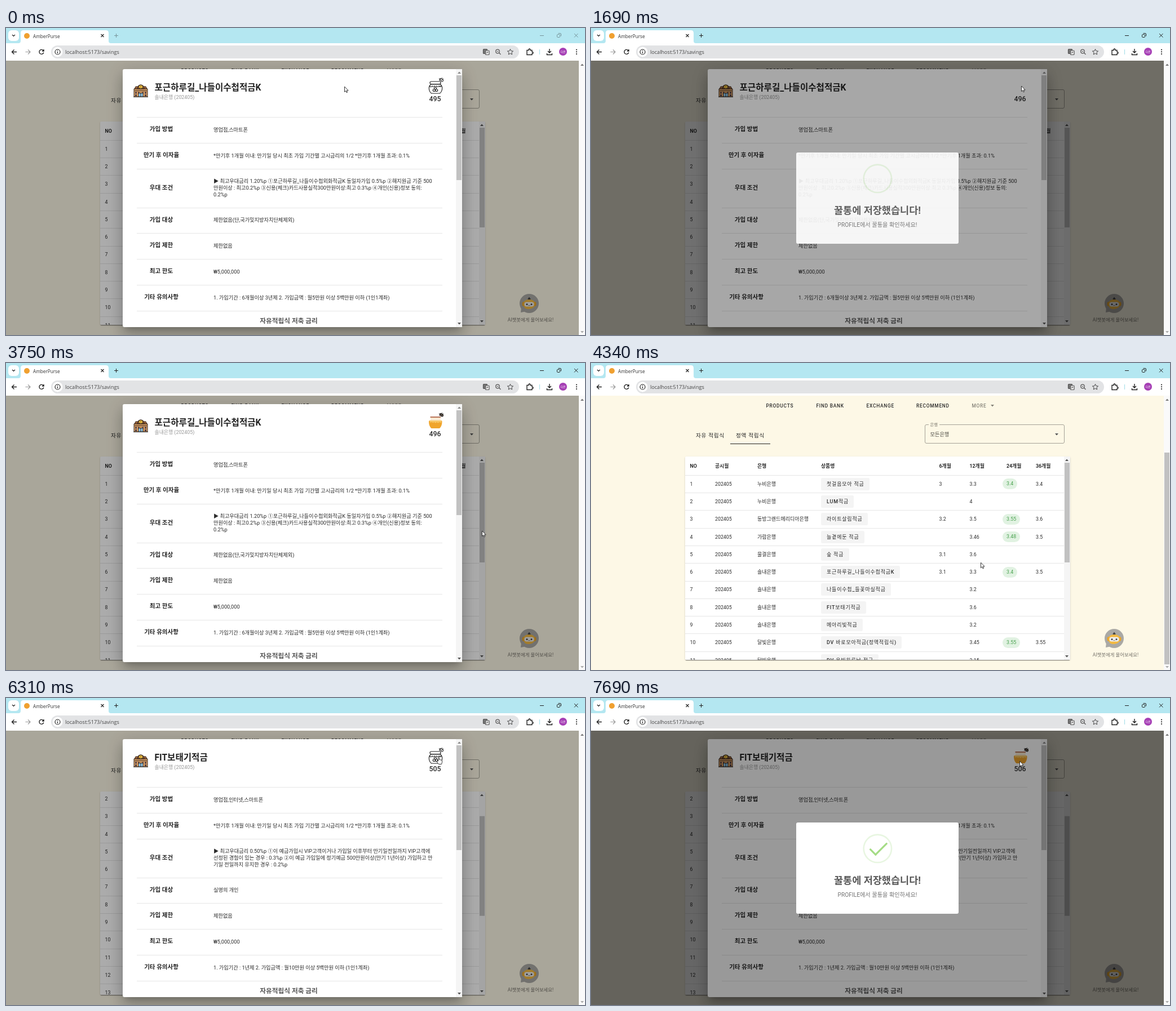
Recreate the animation shown at these times as an HTML page. Size 1027 by 545 pixels, loop 8 s.

```html
<!DOCTYPE html>
<html lang="ko">
<head>
<meta charset="utf-8">
<title>AmberPurse</title>
<style>
* { box-sizing: border-box; }
html, body { margin: 0; width: 100%; height: 100%; overflow: hidden; }
body { font: 9.2px Roboto, "Noto Sans CJK KR", "Noto Sans CJK", sans-serif; color: #2b2b2b; }
div, svg { position: absolute; }
#stage { left: 0; top: 0; width: 1027px; height: 545px; overflow: hidden; background: #fdf8e6; }
.layer { left: 0; top: 0; width: 1027px; height: 545px; }
.t { line-height: 12px; margin-top: -6px; white-space: pre; }
.mid { transform: translateX(-50%); }
.ui { font-family: "Open Sans", "Noto Sans", sans-serif; }
.nav { font-size: 8.4px; font-weight: 500; letter-spacing: .75px; }
.tab { font-size: 9.6px; font-weight: 500; letter-spacing: .75px; color: #222; }
.dim { color: #858278; }

#table { left: 167px; top: 166px; width: 683px; height: 361px; background: #fff; border-radius: 2px; overflow: hidden; }
#tableShadow { left: 167px; top: 166px; width: 683px; height: 361px; border-radius: 2px;
  box-shadow: 0 2px 1px -1px rgba(0,0,0,.3), 0 1px 1px rgba(0,0,0,.2), 0 1px 3px rgba(0,0,0,.15); }
#rows { left: -167px; top: -166px; width: 1027px; height: 860px; animation: rows 8s infinite; }
.line { height: 1px; background: #e6e6e6; }
.btn { height: 22px; line-height: 22px; padding: 0 9.4px 0 10px; border-radius: 2.5px; background: #f4f4f4;
  font-size: 9px; font-weight: 500; letter-spacing: .8px; white-space: pre; }
.hover { animation: hover 8s step-end infinite; }
.chip { height: 19px; line-height: 19px; padding: 0 7px; border-radius: 10px; background: #e1f2e2; color: #46a04c; font-size: 8.8px; }
.cell { font-size: 8.8px; }
.bar { background: #f5f5f5; }
.thumb { background: #c1c1c1; }
#tThumb { left: 840px; top: 177px; width: 9px; height: 177px; animation: tThumb 8s infinite; }
#pThumb { left: 1017px; top: 159px; width: 9px; height: 376px; animation: pThumb 8s step-end infinite; }

.scene { clip-path: inset(58px 11px 0 0); opacity: 0; }
.a { --d: -6480ms; animation: sceneA 8s step-end infinite; }
.b { --d: -1060ms; animation: sceneB 8s step-end infinite; }
.scrim { background: rgba(0,0,0,.33); }
.a .scrim { animation: scrimA 8s infinite; }
.b .scrim { animation: scrimB 8s infinite; }
.dialog { transform-origin: 508px 302px; }
.a .dialog { animation: dialogA 8s infinite; }
.b .dialog { animation: dialogB 8s infinite; }
.card { left: 207px; top: 73px; width: 602px; height: 458px; border-radius: 3px; background: #fff;
  box-shadow: 0 7px 10px -5px rgba(0,0,0,.2), 0 16px 25px 2px rgba(0,0,0,.14), 0 6px 31px 5px rgba(0,0,0,.14); }
.title { font-size: 15.6px; font-weight: 700; color: #222; }
.label { font-size: 10.5px; font-weight: 700; color: #222; }
.count { font-size: 12.4px; font-weight: 500; }
.pre, .post, .full { animation: pre 8s var(--d) step-end infinite; }
.post { animation-name: post; }
.full { animation-name: full; }

.shade { background: rgba(0,0,0,.4); animation: shade 8s var(--d) infinite; }
.popup { animation: popup 8s var(--d) infinite; }
.modal { left: 364px; top: 221px; width: 288px; height: 162px; border-radius: 3px; background: #fff; animation: bounce 8s var(--d) infinite; }
.icon { left: 118.5px; top: 20.5px; width: 80px; height: 80px; transform: scale(.65); transform-origin: 0 0; }
.ring { left: -1.5px; top: -1.5px; width: 80px; height: 80px; border: 4px solid rgba(165,220,134,.25); border-radius: 50%; }
.tip, .long { height: 5px; border-radius: 2px; background: #a5dc86; }
.tip { left: 14px; top: 46px; width: 25px; transform: rotate(45deg); animation: tip 8s var(--d) infinite; }
.long { right: 8px; top: 38px; width: 47px; transform: rotate(-45deg); animation: long 8s var(--d) infinite; }

.caption { animation: caption 8s step-end infinite; }
#cursor { left: 0; top: 0; width: 16px; height: 18px; animation: move 8s ease-in-out infinite; }
#hand { opacity: 0; animation: hand 8s step-end infinite; }
#arrow { animation: arrow 8s step-end infinite; }

@keyframes rows { 0%, 62.3% { transform: none; } 65%, 100% { transform: translateY(-67px); } }
@keyframes tThumb { 0%, 62.3% { transform: none; } 65%, 100% { transform: translateY(32.7px); } }
@keyframes pThumb { 0% { opacity: 0; } 50% { opacity: 1; } 71.2%, 100% { opacity: 0; } }
@keyframes hover { 0% { background: #f4f4f4; } 67% { background: #e2e2e2; } 72%, 100% { background: #f4f4f4; } }
@keyframes sceneA { 0% { opacity: 1; } 53.2%, 100% { opacity: 0; } }
@keyframes sceneB { 0% { opacity: 0; } 71.1%, 100% { opacity: 1; } }
@keyframes scrimA { 0%, 49.4% { opacity: 1; } 53.1%, 100% { opacity: 0; } }
@keyframes scrimB { 0%, 71.2% { opacity: 0; } 75%, 100% { opacity: 1; } }
@keyframes dialogA {
  0%, 49.4% { opacity: 1; transform: none; animation-timing-function: cubic-bezier(.4,0,1,1); }
  51%, 100% { opacity: 0; transform: translate(-30px, 70px) scale(.234, .048); }
}
@keyframes dialogB {
  0%, 71.2% { opacity: 0; transform: translate(-60px, 65px) scale(.135, .048); animation-timing-function: cubic-bezier(0,0,.2,1); }
  74%, 100% { opacity: 1; transform: none; }
}
/* the next ones count from the click on the jar */
@keyframes pre { 0% { opacity: 0; } 50%, 100% { opacity: 1; } }
@keyframes post { 0% { opacity: 1; } 50%, 100% { opacity: 0; } }
@keyframes full { 0% { opacity: 0; } 3% { opacity: 1; } 50%, 100% { opacity: 0; } }
@keyframes shade { 0% { opacity: 0; } 3.75%, 18.2% { opacity: 1; } 21.95%, 100% { opacity: 0; } }
@keyframes popup { 0% { opacity: 0; } 3.4%, 18.2% { opacity: 1; } 20.4%, 100% { opacity: 0; } }
@keyframes bounce { 0% { transform: scale(.5); } 1.1% { transform: scale(1.05); } 1.7% { transform: scale(.97); } 2.1%, 100% { transform: none; } }
@keyframes tip {
  0%, 5.06% { width: 0; left: 1px; top: 19px; }
  6.56% { width: 50px; left: -8px; top: 37px; }
  7.87% { width: 17px; left: 21px; top: 48px; }
  9.37%, 100% { width: 25px; left: 14px; top: 46px; }
}
@keyframes long {
  0%, 6.09% { width: 0; right: 46px; top: 54px; }
  7.87% { width: 55px; right: 0; top: 35px; }
  9.37%, 100% { width: 47px; right: 8px; top: 38px; }
}
@keyframes caption { 0% { opacity: .42; } 17.5%, 100% { opacity: 1; } }
@keyframes hand { 0% { opacity: 0; } 13% { opacity: 1; } 19% { opacity: 0; } 67% { opacity: 1; } 72% { opacity: 0; } 77.5% { opacity: 1; } 86.75%, 100% { opacity: 0; } }
@keyframes arrow { 0% { opacity: 1; } 13% { opacity: 0; } 19% { opacity: 1; } 67% { opacity: 0; } 72% { opacity: 1; } 77.5% { opacity: 0; } 86.75%, 100% { opacity: 1; } }
@keyframes move {
  0%, 9.9% { transform: translate(599px, 103px); }
  11.25%, 12.5% { transform: translate(724px, 106px); }
  13.75% { transform: translate(758px, 104px); }
  16.25%, 33.2% { transform: translate(762px, 102px); }
  38%, 39% { transform: translate(766px, 228px); }
  41.5% { transform: translate(820px, 231px); }
  46.8%, 49.5% { transform: translate(843px, 297px); }
  59.2%, 64% { transform: translate(527px, 413px); }
  67.7%, 71.6% { transform: translate(475px, 369px); }
  78%, 80.6% { transform: translate(763px, 104px); }
  82.4% { transform: translate(771px, 100px); }
  83.75%, 100% { transform: translate(759px, 111px); }
}
</style>
</head>
<body>
<div id="stage"></div>
<script>
const text = (x, y, s, cls = '', css = '') =>
  `<div class="t ${cls}" style="left:${x}px;top:${y}px;${css}">${s}</div>`;
const box = (x, y, w, h, cls = '', css = '') =>
  `<div class="${cls}" style="left:${x}px;top:${y}px;width:${w}px;height:${h}px;${css}"></div>`;
const svg = (x, y, w, h, body, attrs = '') =>
  `<svg ${attrs} style="left:${x}px;top:${y}px" width="${w}" height="${h}" fill="none">${body}</svg>`;
const tri = (x, y, up, color = '#555') =>
  svg(x - 3, y - 2, 6, 4, `<path d="${up ? 'M0 4L3 .5 6 4' : 'M0 0L3 3.5 6 0'}z" fill="${color}"/>`);

// ---- page
const cols = [617.5, 671.5, 737, 789];
const products = [
  ['누비은행', '첫걸음모아 적금', 3, 3.3, 3.4, 3.4],
  ['누비은행', 'LUM적금', '', 4],
  ['동방그랜드메리디아은행', '라이트살림적금', 3.2, 3.5, 3.55, 3.6],
  ['가람은행', '늘곁에둔 적금', '', 3.46, 3.48, 3.5],
  ['물결은행', '숲 적금', 3.1, 3.6],
  ['솔내은행', '포근하루길_나들이수첩적금K', 3.1, 3.3, 3.4, 3.5],
  ['솔내은행', '나들이수첩_들꽃마실적금', '', 3.2],
  ['솔내은행', 'FIT보태기적금', '', 3.6],
  ['솔내은행', '메아리빛적금', '', 3.2],
  ['달빛은행', 'DV 바로모아적금(정액적립식)', '', 3.45, 3.55, 3.55],
  ['달빛은행', 'DV 은빛하루날 적금', '', 3.15],
  ['달빛은행', 'DV 한빛들판 탁구사랑 적금', '', 3.2],
  ['달빛은행', '5분 모으기 적금', 2],
];

function row([bank, name, ...rates], i) {
  const y = 214.6 + 31.3 * i;
  const cells = rates.map((r, k) => r === '' ? '' : k === 2
    ? `<div class="chip" style="left:730px;top:${y - 9.5}px">${r}</div>`
    : text(cols[k], y, r, 'cell')).join('');
  return text(175.5, y, i + 1, 'cell') + text(220, y, '202405', 'cell') + text(295, y, bank, '', 'font-size:9px') +
    `<div class="btn ${i === 7 ? 'hover' : ''}" style="left:408px;top:${y - 11}px">${name}</div>` +
    cells + box(167, Math.round(y + 15.4), 672, 1, 'line');
}

const heads = [[175.5, 'NO'], [220, '공시월'], [295, '은행'], [408, '상품명'],
  [cols[0], '6개월'], [cols[1], '12개월'], [cols[2], '24개월'], [cols[3], '36개월']];

const robot = svg(909, 470, 38, 38, `
  <path d="M5 26L4 35 14 33z" fill="#aaa9a5"/><circle cx="19" cy="19" r="17" fill="#aaa9a5"/>
  <path d="M19 8v5" stroke="#444" stroke-width="1.5"/><path d="M16.500 12q0-3 2.500-3t2.500 3z" fill="#444"/>
  <rect x="6.500" y="16" width="25" height="8" rx="3" fill="#e9a52a"/>
  <path d="M9 20q0-8 10-8t10 8-10 9-10-9z" fill="#f3b941"/>
  <rect x="10.500" y="16.500" width="17" height="8" rx="4" fill="#eee"/>
  <circle cx="15" cy="20.500" r="1.500" fill="#444"/><circle cx="23" cy="20.500" r="1.500" fill="#444"/>
  <path d="M17 22.500h4" stroke="#777" stroke-width=".8"/>`);

const page =
  [[310.5, 'PRODUCTS'], [399.5, 'FIND BANK'], [488.5, 'EXCHANGE'], [577, 'RECOMMEND']]
    .map(([x, s]) => text(x, 76, s, 'nav')).join('') +
  text(675.5, 76, 'MORE', 'nav dim') + tri(712, 76, false, '#858278') +
  text(186, 129, '자유 적립식', 'tab') + text(257, 129, '정액 적립식', 'tab') +
  box(247, 143, 71, 1, '', 'background:#222') +
  box(592, 109, 248, 34, '', 'border:1px solid #a5a297;border-radius:3px') +
  box(599, 108, 19, 4, '', 'background:#fdf8e6') +
  text(601.5, 109.5, '은행', '', 'font-size:7.4px;color:#77746a') +
  text(601.5, 127, '모든은행', '', 'color:#4a4840') + tri(825.5, 127, false) +
  `<div id="tableShadow"></div><div id="table"><div id="rows">` +
  heads.map(([x, s]) => text(x, 182.5, s, 'cell', 'font-weight:700')).join('') +
  box(167, 199, 672, 1, 'line') + products.map(row).join('') + `</div></div>` +
  box(839, 166, 11, 361, 'bar') + `<div id="tThumb" class="thumb"></div>` +
  tri(844, 172, true) + tri(844, 521, false) +
  robot + text(930.5, 518, 'AI챗봇에게 물어보세요!', 'mid', 'font-size:8.4px;color:#77746c');

// ---- dialogs
const bee = fill => `<g stroke="#222" stroke-width=".9"><ellipse cx="24.500" cy="5" rx="3.400" ry="2.200" transform="rotate(30 24 5)" fill="${fill}"/>
  <path d="M23 3l-1 3M25.500 3.500l-1 3.500M20 2l2 2M26 1l-2 2M28 3l-2 1M20 6l2-1"/></g>`;
const jarEmpty = svg(748, 87, 32, 32, `<g stroke="#222" stroke-width="1.200" fill="#fff">
  <path d="M5.500 13q-4 4-3 9 1 5 4 7h15q3-2 4-7 1-5-3-9z"/><rect x="4" y="8" width="19" height="4.500" rx="2"/>
  <path d="M3 16q3 3 5 0 2 3 4 0 2 3 4 0 2 3 4 0 2 2 4 0" fill="none"/>
  <circle cx="13.500" cy="20" r="2"/><circle cx="11.300" cy="23.500" r="2"/><circle cx="15.700" cy="23.500" r="2"/></g>${bee('#fff')}`, 'class="pre"');
const jarFull = svg(748, 87, 32, 32, `
  <path d="M5 9h18v6H5z" fill="#f9ead2"/><path d="M4.500 9h18.500" stroke="#a34a2a" stroke-width="1.500"/>
  <path d="M2 17q0-2 2-2h19.500q2 0 2 2 0 8-4.500 12H6.500Q2 25 2 17z" fill="#f0a52c"/>
  <path d="M4 15h19.500l1 2.500q-2 2.500-4 0-2 4-4.500 0-2 4-4.500 0-2 3-4 0-2 2-4 0z" fill="#f8c766"/>${bee('#6b5a4c')}`, 'class="full"');
const bank = svg(226, 99, 26, 25, `
  <path d="M1 9h24v14H1z" fill="#d9a066" stroke="#33241c"/><path d="M2 9l2-4h18l2 4z" fill="#a3683c" stroke="#33241c"/>
  <path d="M7 9q0-7 6-7t6 7z" fill="#8a5734" stroke="#33241c"/><circle cx="13" cy="5.500" r="3.500" fill="#f6c945" stroke="#33241c"/>
  <path d="M13 3.500v4" stroke="#7a5310"/><path d="M2 12.500h22" stroke="#33241c"/>
  <path d="M3 14.500h3v3H3zM8 14.500h2.500v3H8zM15.500 14.500H18v3h-2.500zM20 14.500h3v3h-3zM3 19h3v3H3zM20 19h3v3h-3z" fill="#4a3a44"/>
  <path d="M9 16.500h8V23H9z" fill="#8cc7ea" stroke="#33241c"/><path d="M13 17v6" stroke="#33241c"/><path d="M0 23.500h26" stroke="#444"/>`);

const labels = ['가입 방법', '만기 후 이자율', '우대 조건', '가입 대상', '가입 제한', '최고 한도', '기타 유의사항'];
const edges = [158, 204, 250, 319, 364, 410, 456, 502];

const popup = `<div class="layer shade"><div class="layer"></div></div><div class="layer popup"><div class="modal">
  <div class="icon"><div class="ring"></div><div class="tip"></div><div class="long"></div></div>
  ${text(144, 103, '꿀통에 저장했습니다!', 'mid', 'font-size:17.5px;font-weight:700;color:#595959')}
  ${text(144, 129, 'PROFILE에서 꿀통을 확인하세요!', 'mid', 'font-size:10.2px;color:#737373')}
</div></div>`;

function scene(cls, title, count, values) {
  const fields = labels.map((label, i) => {
    const y = (edges[i] + edges[i + 1]) / 2 - 1;
    const lines = values[i].split('\n');
    return text(275.5, y, label, 'mid label') + lines.map((s, k) =>
      text(368, y + .5 + 12 * (k - (lines.length - 1) / 2), s)).join('');
  }).join('');
  return `<div class="layer scene ${cls}"><div class="layer scrim"></div><div class="layer dialog"><div class="card"></div>` +
    bank + text(263.5, 105.5, title, 'title') + text(263.5, 122.5, '솔내은행 (202405)', '', 'font-size:8.9px;color:#999') +
    jarEmpty + jarFull + text(761, 126, count, 'mid count pre') + text(761, 126, count + 1, 'mid count post') +
    edges.map(y => box(232, y, 542, 1, 'line')).join('') + fields +
    text(501.5, 519.5, '자유적립식 저축 금리', 'mid', 'font-size:11.7px;font-weight:700;color:#555') +
    box(798, 73, 11, 458, 'bar') + box(799, 84, 9, 186, 'thumb') + tri(803.5, 79, true, '#888') + tri(803.5, 525, false) +
    `</div>${popup}</div>`;
}

const maturity = '*만기후 1개월 이내: 만기일 당시 최초 가입 기간별 고시금리의 1/2 *만기후 1개월 초과: 0.1%';
const scenes = scene('a', '포근하루길_나들이수첩적금K', 495, [
  '영업점,스마트폰', maturity,
  '▶ 최고우대금리 1.20%p ①포근하루길_나들이수첩외화적금K 동일자가입 0.5%p ②해지원금 기준 500\n만원이상 : 최고0.2%p ③신용(체크)카드사용실적300만원이상:최고 0.3%p ④개인(신용)정보 동의:\n0.2%p',
  '제한없음(단,국가및지방자치단체제외)', '제한없음', '₩5,000,000',
  '1. 가입기간 : 6개월이상 3년제 2. 가입금액 : 월5만원 이상 5백만원 이하 (1인1계좌)',
]) + scene('b', 'FIT보태기적금', 505, [
  '영업점,인터넷,스마트폰', maturity,
  '▶ 최고우대금리 0.50%p ①이 예금가입시 VIP고객이거나 가입일 이후부터 만기일전일까지 VIP고객에\n선정된 경험이 있는 경우 : 0.3%p ②이 예금 가입일에 정기예금 500만원이상(만기 1년이상) 가입하고 만\n기일 전일까지 유지한 경우 : 0.2%p',
  '실명의 개인', '제한없음', '₩5,000,000',
  '1. 가입기간 : 1년제 2. 가입금액 : 월10만원 이상 5백만원 이하 (1인1계좌)',
]);

// ---- browser window
const browser = svg(0, 0, 1027, 58, `
  <path d="M0 0h1027v58H0z" fill="#b4e7f1"/><path d="M0 27h1027v31H0z" fill="#fff"/>
  <path d="M22 27q4 0 4-4V9q0-5 5-5h146q5 0 5 5v14q0 4 4 4z" fill="#fff"/>
  <rect x="4" y="4" width="19" height="19" rx="6" fill="#fff"/>
  <circle cx="37" cy="14" r="5" fill="#f0a030"/>
  <rect x="80" y="31" width="830" height="23" rx="11.500" fill="#e2e3e5"/><circle cx="91.500" cy="42.500" r="9" fill="#fff"/>
  <g stroke="#222" stroke-width="1.200">
    <path d="M11 12l2.500 2.500L16 12M168.500 11l5 5m0-5l-5 5"/>
    <path d="M19 42.500h-8m3.500-4l-4 4 4 4" stroke-width="1.400"/>
    <path d="M34.500 42.500h8m-3.500-4l4 4-4 4" stroke="#999"/>
    <path d="M66.500 40.500a4 4 0 1 0 .3 3M67 38v3h-3" stroke-width="1.400"/>
    <circle cx="91.500" cy="42.500" r="4.500"/><path d="M91.500 42v3m0-5.200v1.200"/>
    <g stroke="#555"><rect x="846.500" y="37.500" width="7" height="8" rx="1" fill="#777"/><rect x="850.500" y="40" width="6.500" height="7.500" rx="1" fill="#eee"/><path d="M852 43h3.500m-1.700-1v1q0 2-1.800 2.500" stroke-width=".8"/>
      <circle cx="872" cy="41.500" r="3.300"/><path d="M874.500 44l3 3M870.500 41.500h3"/></g>
    <path d="M894.500 37.500l1.500 3.200 3.600.4-2.700 2.400.8 3.500-3.200-1.800-3.200 1.800.8-3.500-2.700-2.400 3.600-.4z" stroke="#444" stroke-width="1"/>
    <path d="M924 39.500h3q0-2.500 1.500-2.500t1.500 2.500h3v3q2 0 2 1.500t-2 1.500v2h-9z" stroke-width="1.400"/>
    <path d="M946.500 38v9" stroke="#a9dfea"/>
    <path d="M964 37v7m-3-3l3 3 3-3M959.500 45v2.500h9V45" stroke-width="1.400"/>
  </g>
  <circle cx="988" cy="42" r="7" fill="#a63fb5"/>
  <g fill="#222"><circle cx="1012" cy="38.500" r="1.100"/><circle cx="1012" cy="42.300" r="1.100"/><circle cx="1012" cy="46.100" r="1.100"/></g>
  <g class="caption" stroke="#222"><path d="M947 13.500h7M1008 10l6.500 6.500m0-6.500l-6.500 6.500M192 13.500h7M195.500 10v7"/>
    <rect x="977.500" y="11.500" width="5" height="5" rx="1"/><path d="M979.500 9.500h3.500q1.500 0 1.500 1.500v3.500"/></g>`) +
  text(48, 14.5, 'AmberPurse', 'ui', 'font-size:8.2px;color:#333') +
  text(105, 42.5, 'localhost:5173/savings', 'ui', 'font-size:9.1px;color:#444') +
  text(988, 42, '다온', 'mid', 'font-size:5px;color:#fff') +
  box(1016, 58, 11, 487, 'bar', 'background:#fafafa') + `<div id="pThumb" class="thumb"></div>` +
  tri(1021.5, 65, true, '#777') + tri(1021.5, 540, false, '#aaa');

const outline = 'fill="#fff" stroke="#222" stroke-width=".9"';
const cursor = `<div id="cursor">` +
  svg(0, 0, 14, 16, `<path d="M1.500 1v9.500l2.200-2 1.400 3.300 1.500-.7-1.400-3.100h3z" ${outline}/>`, 'id="arrow"') +
  svg(0, 0, 14, 16, `<path d="M3.500 8V1.700q1-1.400 2 0V5.500q1.200-.8 1.800.4 1.200-.6 1.700.5 1.500-.3 1.500 1.300v2.500L9.500 13.500h-5L1.200 9.200q-.2-1.500 1.200-1.200z" ${outline}/>`, 'id="hand"') +
  `</div>`;

document.getElementById('stage').innerHTML = page + scenes + browser + cursor;
</script>
</body>
</html>
```
